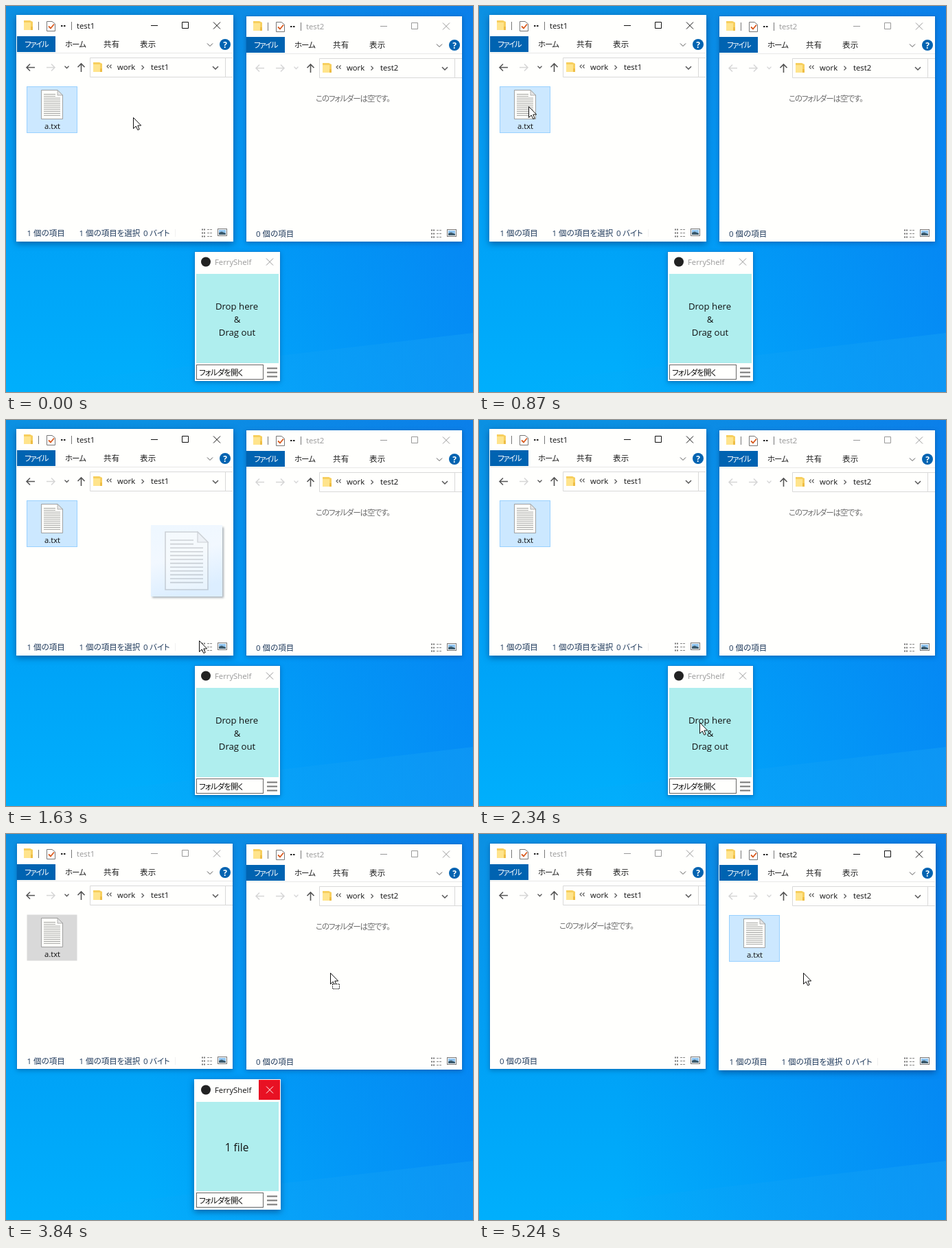
Animation of 680 by 562 pixels, one loop 5270 ms. Source, as an HTML page:

```html
<!DOCTYPE html>
<html lang="ja">
<head>
<meta charset="utf-8">
<title>Drag and drop</title>
<style>
html, body { margin: 0; width: 100%; height: 100%; overflow: hidden; background: #0098f2; }
svg { display: block; width: 680px; height: 562px; }
text { font: 11.3px "Open Sans", "Noto Sans CJK JP", sans-serif; font-feature-settings: "palt"; fill: #111; white-space: pre; }
.line { fill: none; stroke: #555; }
.pale { stroke: #d6d6d6; }
.jp { font-size: 11.5px; }
.frame { fill: #fffffd; stroke: #0a6cc0; stroke-opacity: .35; stroke-width: 2; paint-order: stroke; filter: drop-shadow(0 2px 3px rgba(0, 40, 90, .35)); }
.on .frame { stroke: #fffffd; stroke-opacity: 1; filter: drop-shadow(0 3px 5px rgba(0, 30, 80, .5)); }
.caption { fill: #999; }
.control { fill: none; stroke: #999; }
.on .caption { fill: #111; }
.on .control { stroke: #111; }
.chosen { fill: #d9d9d9; }
.on .chosen { fill: #cce8ff; stroke: #99d1ff; }
.center { text-anchor: middle; font-size: 13.2px; }
</style>
</head>
<body>
<svg id="stage" viewBox="0 0 680 562">
  <defs>
    <linearGradient id="sky" x2="0" y2="1">
      <stop offset="0" stop-color="#0c90e2"/>
      <stop offset=".3" stop-color="#0698ee"/>
      <stop offset=".66" stop-color="#00a4f8"/>
      <stop offset="1" stop-color="#00affc"/>
    </linearGradient>
    <linearGradient id="dusk">
      <stop offset=".3" stop-color="#0a6ef0" stop-opacity="0"/>
      <stop offset="1" stop-color="#0a6ef0" stop-opacity=".5"/>
    </linearGradient>
    <linearGradient id="beam">
      <stop offset=".1" stop-color="#18a4f4" stop-opacity="0"/>
      <stop offset="1" stop-color="#18a4f4" stop-opacity=".4"/>
    </linearGradient>
    <linearGradient id="veil" x2=".3" y2="1">
      <stop offset="0" stop-color="#eef7ff"/>
      <stop offset=".5" stop-color="#f2f8ff"/>
      <stop offset="1" stop-color="#dceeff"/>
    </linearGradient>
    <g id="doc">
      <path d="M.5 .5H24L31.5 8V42.5H.5Z" fill="#fffffb" stroke="#8c8c8c" stroke-width=".8"/>
      <path d="M24 .5V8H31.5Z" fill="#e6e6e6" stroke="#8c8c8c" stroke-width=".6"/>
      <path id="rules" fill="none" stroke="#8a8a8a" stroke-width=".8"/>
    </g>
    <g id="folder">
      <path d="M0 0H9L13 2V14H0Z" fill="#f7cf5e"/>
      <path d="M0 3H10V14H0Z" fill="#ffe48c"/>
      <path d="M10 9H13V14H10Z" fill="#eebd45"/>
    </g>
  </defs>

  <rect width="680" height="562" fill="url(#sky)"/>
  <rect width="680" height="562" fill="url(#dusk)"/>
  <path d="M0 556L680 476V562H0Z" fill="url(#beam)"/>

  <g id="left"></g>
  <g id="right" transform="translate(334 1)"></g>

  <g id="app">
    <rect class="frame" x="275" y="358" width="124" height="188"/>
    <rect x="277" y="390" width="120" height="130" fill="#afeeee"/>
    <circle cx="291" cy="372.5" r="7" fill="#222"/>
    <text class="caption" x="304" y="377">FerryShelf</text>
    <rect id="hot" x="368" y="358" width="31" height="29" fill="#e81123"/>
    <path id="appClose" class="control" d="M379 367.500L389 377.500M389 367.500L379 377.500"/>
    <g id="hint">
      <text class="center" x="336" y="442">Drop here</text>
      <text class="center" x="336.500" y="461">&amp;</text>
      <text class="center" x="336.500" y="480">Drag out</text>
    </g>
    <text id="count" class="center" x="336" y="462" style="font-size:15.500px">1 file</text>
    <rect x="277.500" y="522.500" width="97" height="21" fill="#fffffd" stroke="#666"/>
    <text class="jp" x="281" y="538" letter-spacing="-.9">フォルダを開く</text>
    <path d="M380 527.500H395M380 533.500H395M380 539.500H395" stroke="#777" stroke-width="2"/>
  </g>

  <g id="ghost">
    <rect x="2" y="3" width="104" height="103" fill="#456" opacity=".45" style="filter:blur(1.500px)"/>
    <rect width="104" height="104" fill="url(#veil)"/>
    <use href="#doc" transform="translate(20 9) scale(2)" opacity=".35"/>
  </g>
  <g id="cursor">
    <g id="arrow">
      <path d="M.5 .5V16.500L4.200 13 6.800 18.500 9.200 17.500 6.800 12H11.700Z" fill="#fff" stroke="#111"/>
      <rect id="badge" x="3.500" y="16.500" width="10" height="7" fill="#fff" stroke="#111" stroke-dasharray="1.500 1"/>
    </g>
    <g id="stop" fill="none">
      <path d="M-5.200 -5.200L5.200 5.200" stroke="#fff" stroke-width="5"/>
      <circle r="7.500" stroke="#fff" stroke-width="4"/>
      <circle r="7.500" stroke="#111" stroke-width="2.400"/>
      <path d="M-5.200 -5.200L5.200 5.200" stroke="#111" stroke-width="2.600"/>
    </g>
  </g>
</svg>

<script>
const LOOP = 5270;
const $ = id => document.getElementById(id);
const show = (id, on) => { $(id).style.display = on ? '' : 'none'; };
const text = (x, y, s, extra = '') => `<text x="${x}" y="${y}" ${extra}>${s}</text>`;
const jp = (x, y, s, gap = 0, color = '#222') =>
  text(x, y, s, `class="jp" letter-spacing="${gap}" style="fill:${color}"`);
const note = (x, s, gap) => jp(x, 335, s, gap, '#1e395b');
const line = (d, cls = '', width = 1) => `<path class="line ${cls}" d="${d}" stroke-width="${width}"/>`;

$('rules').setAttribute('d', Array.from({ length: 12 }, (_, i) =>
  `M4 ${6.5 + i * 2.8}H${i < 2 ? 21 : 28}`).join(''));

function explorer(id, title, history) {
  return `<rect class="frame" x="16" y="14" width="314" height="328"/>
    <use href="#folder" x="26" y="21"/>
    ${line('M47.5 23V35M95.5 23V35', '', .8)}
    <path d="M59.5 22.500H67L71.500 26V36.500H59.500Z" fill="#fff" stroke="#777"/>
    <path d="M62 29.500L65 32.500 70 26.500" fill="none" stroke="#d8581c" stroke-width="1.800"/>
    <path d="M80 28h2.500v2h-2.500zM84 28h2.500v2h-2.500z" fill="#222"/>
    ${text(103, 33, title, 'class="caption"')}
    <path class="control" d="M211 28.500H221M256.500 23.500H265.500V32.500H256.500ZM302 23.500L312 33.500M312 23.500L302 33.500"/>
    <rect x="16" y="44" width="56" height="23" fill="#0063b1"/>
    ${jp(27, 60, 'ファイル', -1.4, '#fff')}${jp(86, 60, 'ホーム', -1)}
    ${jp(142, 60, '共有', .3)}${jp(195, 60, '表示', .3)}
    <path d="M16 68.500H330" stroke="#e8e8e8"/>
    ${line('M293 54.500L297 58.500 301 54.500')}
    <circle cx="319" cy="56" r="8" fill="#0063b1"/>
    ${text(319, 60.5, '?', 'text-anchor="middle" style="fill:#fff;font-weight:700;font-size:12px"')}
    ${line('M42 89.500H30.500M35 84.500L30 89.500 35 94.500', history ? '' : 'pale', 1.5)}
    ${line('M59 89.500H70.500M66 84.500L71 89.500 66 94.500', 'pale', 1.5)}
    ${line('M85.500 87.500L88.500 90.500 91.500 87.500', history ? '' : 'pale', 1.3)}
    ${line('M109.500 96V84.500M104.500 89L109.500 84 114.500 89', '', 1.6)}
    <path d="M330 75.500H122.500V103.500H330M319.500 75V103" fill="none" stroke="#d9d9d9"/>
    <use href="#folder" x="127" y="82"/>
    ${line('M149.500 85.500L147 88 149.500 90.500M153.500 85.500L151 88 153.500 90.500', '', 1.1)}
    ${text(162, 93, 'work')}${line('M197.500 86.500L200.500 89.500 197.500 92.500', '', 1.2)}
    ${text(211, 93, title)}
    ${line('M301 88L305 92 309 88', '', 1.5)}
    <g id="${id}File">
      <rect class="chosen" x="30.500" y="117.500" width="73" height="67"/>
      <use href="#doc" x="51" y="122"/>
      ${text(67.5, 179, 'a.txt', 'text-anchor="middle"')}
      ${note(30.5, '1 個の項目')}${note(106.5, '1 個の項目を選択')}${note(200, '0 バイト', -.2)}
      <path d="M246.500 325V336" stroke="#f0f0f0"/>
    </g>
    <g id="${id}Empty">
      ${jp(117, 138, 'このフォルダーは空です。', -1.1, '#6d6d6d')}
      ${note(30, '0 個の項目')}
    </g>
    <path d="M285 325.500H291M285 330.500H291M285 335.500H291" stroke="#777" stroke-width="2" stroke-dasharray="2 1"/>
    <path d="M293 325.500H301M293 330.500H301M293 335.500H301" stroke="#888" stroke-dasharray="3 1"/>
    <rect x="308.500" y="324.500" width="13" height="10" fill="#fff" stroke="#777"/>
    <path d="M310 326H320V333H310Z" fill="#8fc4f0"/><path d="M310 333V330L314 328.500 320 331V333Z" fill="#3c5a6c"/>`;
}
$('left').innerHTML = explorer('left', 'test1', true);
$('right').innerHTML = explorer('right', 'test2', false);

// time, x, y of the pointer tip
const path = [
  [0, 185, 162], [60, 185, 162], [320, 125, 151], [600, 72, 146], [1220, 72, 146],
  [1430, 160, 182], [1570, 262, 248], [1630, 281, 320], [1720, 302, 392], [1900, 321, 440],
  [2900, 321, 440], [3100, 337, 414], [3240, 361, 382], [3310, 385, 362], [3400, 416, 305],
  [3560, 455, 235], [3740, 472, 202], [LOOP, 472, 202]
];

function slope(i, k) {
  const a = path[i - 1], p = path[i], b = path[i + 1];
  if (!a || !b || a[k] === p[k] || b[k] === p[k]) return 0;
  return (b[k] - a[k]) / (b[0] - a[0]);
}

function pointer(t) {
  const i = Math.max(0, path.findIndex(p => p[0] > t) - 1);
  const a = path[i], b = path[i + 1], d = b[0] - a[0], u = (t - a[0]) / d;
  return [1, 2].map(k => {
    const h = u * u * (3 - 2 * u);
    return a[k] + (b[k] - a[k]) * h
      + d * u * (1 - u) * ((1 - u) * slope(i, k) - u * slope(i + 1, k));
  });
}

const place = (id, x, y) => $(id).setAttribute('transform', `translate(${Math.round(x)} ${Math.round(y)})`);

function draw(t) {
  const within = (a, b) => t >= a && t < b;
  const [x, y] = pointer(t);
  const dropped = t >= 4100;
  const blocked = within(2960, 3400) && y > 343;

  place('cursor', x, y);
  show('arrow', !blocked);
  show('stop', blocked);
  show('badge', (within(1640, 2100) && y > 358) || (within(3300, 4040) && !blocked));

  // the dragged picture trails the pointer
  const [gx, gy] = pointer(Math.max(0, t - 60));
  place('ghost', gx - 52, gy - 96);
  show('ghost', within(1260, 1900) && y < 358);

  $('left').classList.toggle('on', t < 2900);
  $('app').classList.toggle('on', t >= 2900);
  $('right').classList.toggle('on', dropped);
  show('leftFile', !dropped);
  show('leftEmpty', dropped);
  show('rightFile', dropped);
  show('rightEmpty', !dropped);

  show('hint', t < 2400);
  show('count', t >= 2400);
  show('hot', t >= 3300);
  $('appClose').style.stroke = t >= 3300 ? '#fff' : '';
  $('app').style.opacity = Math.max(0, Math.min(1, (4220 - t) / 150));
}

const start = performance.now();
function tick() {
  draw((performance.now() - start) % LOOP);
  requestAnimationFrame(tick);
}
tick();
</script>
</body>
</html>
```
